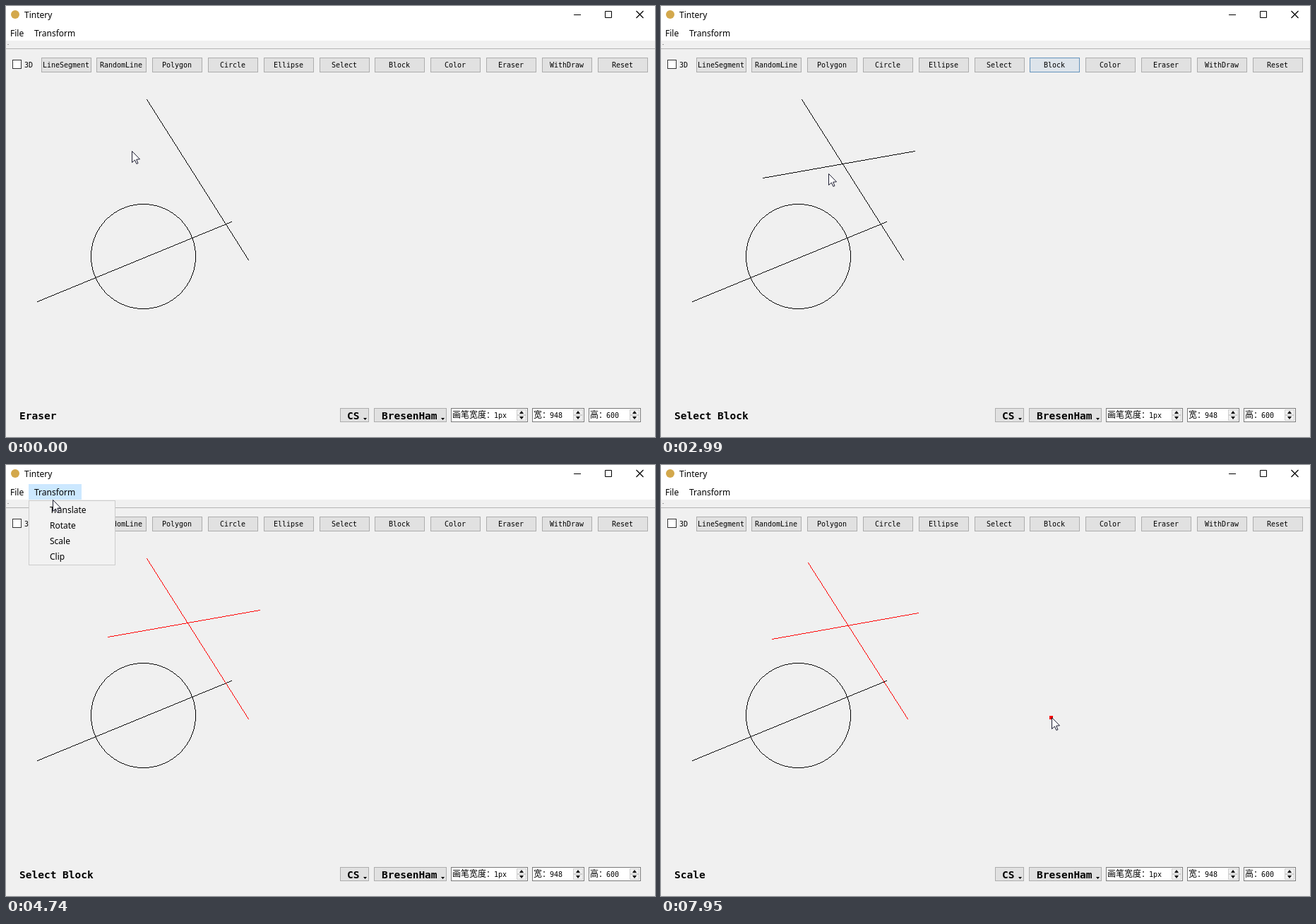
These frames come from a looping animation (919 px wide and 610 px high, 8 s). An HTML page:

```html
<!DOCTYPE html>
<html lang="en">
<head>
<meta charset="utf-8">
<title>Tintery</title>
<style>
  html, body { margin: 0; width: 100%; height: 100%; overflow: hidden; background: #f0f0f0; }
  svg { display: block; position: absolute; left: 0; top: 0; }
  text { white-space: pre; fill: #000; }
  .ui { font: 12px "Noto Sans", "Open Sans", sans-serif; }
  .mono { font: 10px "DejaVu Sans Mono", "Liberation Mono", monospace; }
  .big { font: bold 14.5px "DejaVu Sans Mono", "Liberation Mono", monospace; }
  .cjk { font: 12px "Noto Sans CJK SC", "Noto Sans CJK", sans-serif; }
  .ink { fill: none; stroke: #000; shape-rendering: crispEdges; }
</style>
</head>
<body>
<svg id="stage" width="919" height="610" viewBox="0 0 919 610"></svg>
<script>
const LOOP = 8000;
const stage = document.getElementById('stage');

function add(tag, attrs, text, parent = stage) {
  const el = document.createElementNS(stage.namespaceURI, tag);
  for (const key in attrs) el.setAttribute(key, attrs[key]);
  if (text) el.textContent = text;
  parent.append(el);
  return el;
}
const label = (cls, x, y, text, parent, anchor = 'start') =>
  add('text', { class: cls, x, y, 'text-anchor': anchor }, text, parent);
const fill = (x, y, width, height, color, parent) =>
  add('rect', { x, y, width, height, fill: color }, '', parent);
// Outlined box covering whole pixels
const box = (x, y, w, h, color, stroke, parent) =>
  add('rect', { x: x + .5, y: y + .5, width: w - 1, height: h - 1, fill: color, stroke }, '', parent);
const path = (d, attrs, parent) => add('path', { d, ...attrs }, '', parent);
const show = (el, on) => el.setAttribute('visibility', on ? 'visible' : 'hidden');

// Window frame
fill(0, 0, 919, 610, '#f0f0f0');
fill(0, 0, 919, 49, '#fff');
add('circle', { cx: 13, cy: 12, r: 6, fill: '#d3a84c' });
label('ui', 26, 17, 'Tintery');
path('M804 12.5h10M848.5 7.5h9v9h-9z', { fill: 'none', stroke: '#000' });
path('M892.5 7l10 10M902.5 7l-10 10', { fill: 'none', stroke: '#000', 'stroke-width': 1.2 });
const menuTitle = fill(32, 27, 75, 22, '#e5f3ff');
label('ui', 6, 43, 'File');
label('ui', 40, 43, 'Transform');
fill(2, 54, 2, 1, '#a0a0a0');
fill(0, 60, 919, 1, '#b4b4b4');

// Tool buttons
box(9, 76, 13, 13, '#fff', '#333');
label('mono', 26, 87, '3D');
const names = ['LineSegment', 'RandomLine', 'Polygon', 'Circle', 'Ellipse', 'Select',
  'Block', 'Color', 'Eraser', 'WithDraw', 'Reset'];
const buttons = names.map((name, i) => {
  const x = Math.round(49.6 + 78.8 * i);
  const rect = box(x, 73, 71, 21, '#e1e1e1', '#adadad');
  label('mono', x + 35, 87, name, stage, 'middle');
  return rect;
});

// Bottom bar
const status = label('big', 19, 585, 'Eraser');
function combo(x, w, text, textX) {
  box(x, 569, w, 20, '#e1e1e1', '#adadad');
  label('big', textX, 585, text);
  path(`M${x + w - 8} 583h5l-2.5 3z`, { fill: '#000' });
}
combo(473, 41, 'CS', 483);
combo(521, 103, 'BresenHam', 532);

function spin(x, w, caption, value, valueX) {
  box(x, 569, w, 20, '#fff', '#7a7a7a');
  label('cjk', x + 2, 583, caption);
  label('mono', valueX, 583, value);
  const bx = x + w - 16;
  box(bx, 571, 14, 8, '#f0f0f0', '#d0d0d0');
  box(bx, 579, 14, 8, '#f0f0f0', '#d0d0d0');
  path(`M${bx + 4} 577h6l-3-4zM${bx + 4} 581h6l-3 4z`, { fill: '#000' });
}
spin(630, 109, '画笔宽度：', '1px', 691);
spin(745, 74, '宽：', '948', 770);
spin(825, 74, '高：', '600', 850);

// Pixel-stepped strokes
const dot = (x, y) => `M${x} ${y + .5}h1`;
function pixelLine([x0, y0], [x1, y1]) {
  const n = Math.max(Math.abs(x1 - x0), Math.abs(y1 - y0)) || 1;
  let d = '';
  for (let i = 0; i <= n; i++)
    d += dot(Math.round(x0 + (x1 - x0) * i / n), Math.round(y0 + (y1 - y0) * i / n));
  return d;
}
function pixelCircle(cx, cy, r) {
  let d = '';
  for (let x = 0; x <= r * Math.SQRT1_2; x++) {
    const y = Math.round(Math.sqrt(r * r - x * x));
    for (const [a, b] of [[x, y], [y, x]])
      d += dot(cx + a, cy + b) + dot(cx - a, cy + b) + dot(cx + a, cy - b) + dot(cx - a, cy - b);
  }
  return d;
}
path(pixelCircle(194, 354, 74), { class: 'ink' });
path(pixelLine([44, 418], [319, 305]), { class: 'ink' });
const steep = path('', { class: 'ink' });
const flat = path('', { class: 'ink' });
const pivotMark = fill(550, 355, 5, 5, '#f00');

// Drop-down menu
const menu = add('g', {});
box(32, 50, 123, 92, '#f2f2f2', '#ccc', menu);
const menuRow = fill(35, 53, 117, 22, '#91c9f7', menu);
['Translate', 'Rotate', 'Scale', 'Clip'].forEach((name, i) => label('ui', 62, 68 + 22 * i, name, menu));

const cursor = path('M.5 .5V16.5L4.4 13 6.9 18.4 9 17.5 6.7 12.2 11.5 11.8Z',
  { fill: '#fff', stroke: '#1c1c30', 'stroke-width': 1 });

// Pointer track: time, x, y
const track = [
  [0, 178, 205], [130, 178, 205], [560, 92, 84], [700, 92, 84],
  [1110, 154, 220], [1240, 144, 243], [1390, 144, 243],
  [1870, 359, 205], [2000, 359, 205], [2020, 362, 205],
  [2380, 556, 84], [2500, 556, 84], [2820, 237, 243], [2850, 237, 243],
  [2990, 237, 237], [3120, 208, 200], [3200, 208, 200], [3650, 296, 254], [3670, 296, 254],
  [4160, 52, 96], [4460, 62, 38], [4560, 62, 38], [5260, 88, 103], [5400, 88, 103],
  [5420, 90, 103], [6210, 538, 355], [6260, 544, 356], [6610, 553, 357], [LOOP, 553, 357]
];
const same = (a, b) => a[1] === b[1] && a[2] === b[2];
function speed(i, axis) {
  const a = track[i - 1], b = track[i], c = track[i + 1];
  if (!a || !c || same(a, b) || same(b, c)) return 0;
  return (c[axis] - a[axis]) / (c[0] - a[0]);
}
function pointer(t) {
  let i = 0;
  while (i < track.length - 2 && t >= track[i + 1][0]) i++;
  const a = track[i], b = track[i + 1], span = b[0] - a[0], u = (t - a[0]) / span;
  return [1, 2].map(k => Math.round(
    a[k] + (b[k] - a[k]) * u * u * (3 - 2 * u) +
    span * u * (1 - u) * ((1 - u) * speed(i, k) - u * speed(i + 1, k))));
}

// Stepped values: the last entry at or before t
const at = (steps, t) => steps.filter(s => s[0] <= t).pop()[1];
const captions = [[0, 'Eraser'], [780, 'LineSegment'], [2500, 'Select Block'], [5420, 'Scale']];

const looks = {
  normal: ['#e1e1e1', '#adadad'], hover: ['#e5f1fb', '#0078d7'], pressed: ['#cce4f7', '#005499'],
  fading: ['#dde4eb', '#6593bb'], faint: ['#e0e2e4', '#a5adb4']
};
const lineLook = [[0, 'normal'], [430, 'hover'], [700, 'pressed'], [780, 'hover'], [860, 'fading'], [1000, 'normal']];
const blockLook = [[0, 'normal'], [2310, 'hover'], [2430, 'pressed'], [2500, 'hover'],
  [2850, 'fading'], [3120, 'faint'], [4480, 'normal']];
function paint(button, steps, t) {
  const [color, edge] = looks[at(steps, t)];
  button.setAttribute('fill', color);
  button.setAttribute('stroke', edge);
}

// Each wheel notch scales the endpoints about the pivot and snaps them to pixels
const pivot = [553, 357];
const notches = [[6870, .9], [7000, .9], [7410, 1.1], [7590, 1.1], [7790, 1.1], [7950, .9]];
function scaled(point, t) {
  return point.map((v, k) => notches.reduce(
    (offset, [time, factor]) => t >= time ? Math.round(offset * factor) : offset,
    pivot[k] - v)).map((offset, k) => pivot[k] - offset);
}
function drawStroke(el, from, to, t) {
  el.setAttribute('d', pixelLine(scaled(from, t), scaled(to, t)));
  el.style.stroke = t >= 3670 ? '#f00' : '#000';
}

function render(t) {
  const [x, y] = pointer(t);
  cursor.setAttribute('transform', `translate(${x} ${y})`);

  drawStroke(steep, [199, 132], [343, 359], t);
  show(flat, t >= 1390);
  drawStroke(flat, [144, 243], t < 1870 ? [x, y] : [359, 205], t);
  show(pivotMark, t >= 6610);

  const caption = at(captions, t);
  if (status.textContent !== caption) status.textContent = caption;
  paint(buttons[0], lineLook, t);
  paint(buttons[6], blockLook, t);

  const open = t >= 4480 && t < 5420;
  show(menu, open);
  show(menuTitle, open || (t >= 4390 && t < 4480));
  menuTitle.setAttribute('fill', open ? '#cce8ff' : '#e5f3ff');
  const row = Math.floor((y - 53) / 22);
  menuRow.setAttribute('y', 53 + 22 * row);
  show(menuRow, open && row >= 0);
}

const start = performance.now();
function tick() {
  render((performance.now() - start) % LOOP);
  requestAnimationFrame(tick);
}
tick();
</script>
</body>
</html>
```
